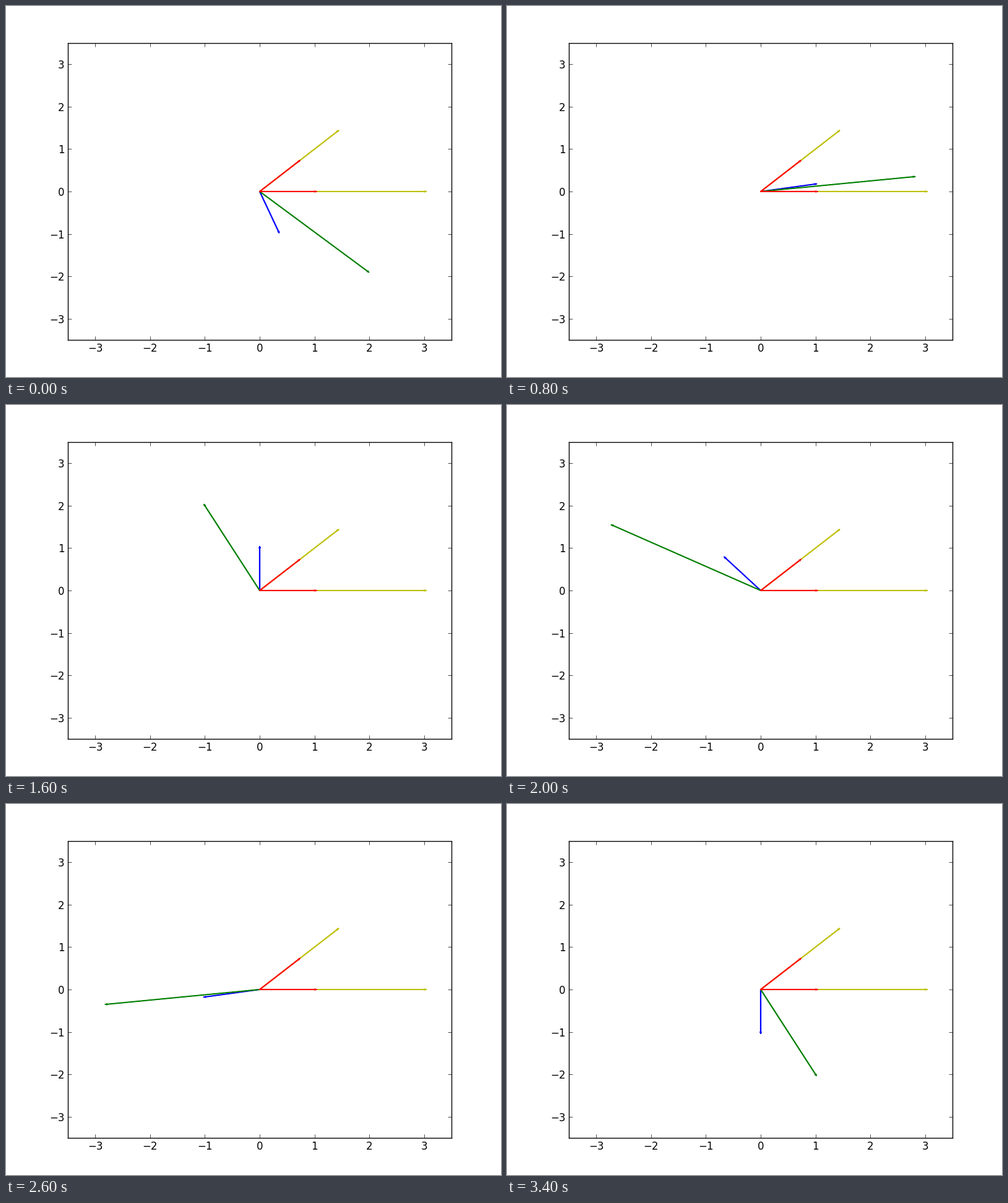
These frames come from a looping animation (800 by 600 pixels, 3.6 s). A matplotlib script:

```python
import numpy as np
import matplotlib.pyplot as plt
from matplotlib.animation import FuncAnimation
from matplotlib.patches import FancyArrow, PathPatch
from matplotlib.path import Path

STEPS = 18
START, TURN = -70, 20  # degrees
MATRIX = np.array([[3, -1], [0, 2]])

plt.rcParams.update({
    "font.family": "DejaVu Sans",
    "font.size": 12,
    "axes.linewidth": 1.0,
    "patch.linewidth": 1.0,
})


def arrow_path(vec):
    """Outline of an arrow from the origin, left open at its tip."""
    shape = FancyArrow(0, 0, *vec, width=0.01)
    return Path(shape.get_xy())


def add_arrow(vec, color, zorder):
    patch = PathPatch(arrow_path(vec), fc=color, ec=color, zorder=zorder)
    return ax.add_patch(patch)


def unit(degrees):
    a = np.radians(degrees)
    return np.array([np.cos(a), np.sin(a)])


fig = plt.figure(figsize=(8, 6), dpi=100, facecolor="white")
ax = fig.add_axes([0.125, 0.1, 0.775, 0.8])
ax.set(xlim=(-3.5, 3.5), ylim=(-3.5, 3.5),
       xticks=range(-3, 4), yticks=range(-3, 4))
ax.tick_params(direction="in", length=4, width=0.5, top=True, right=True)
ax.tick_params(axis="x", pad=3.4)
ax.tick_params(axis="y", pad=4)

vector = add_arrow(unit(START), "b", 1.0)
image = add_arrow(MATRIX @ unit(START), "g", 1.1)

# The two eigenvectors and their images keep their direction.
for angle in (0, 45):
    add_arrow(MATRIX @ unit(angle), "y", 1.2)
    add_arrow(unit(angle), "r", 1.3)


def update(step):
    v = unit(START + TURN * step)
    vector.set_path(arrow_path(v))
    image.set_path(arrow_path(MATRIX @ v))
    return vector, image


anim = FuncAnimation(fig, update, frames=STEPS, interval=200,
                     repeat=True, repeat_delay=0, blit=False)
plt.show()
```
